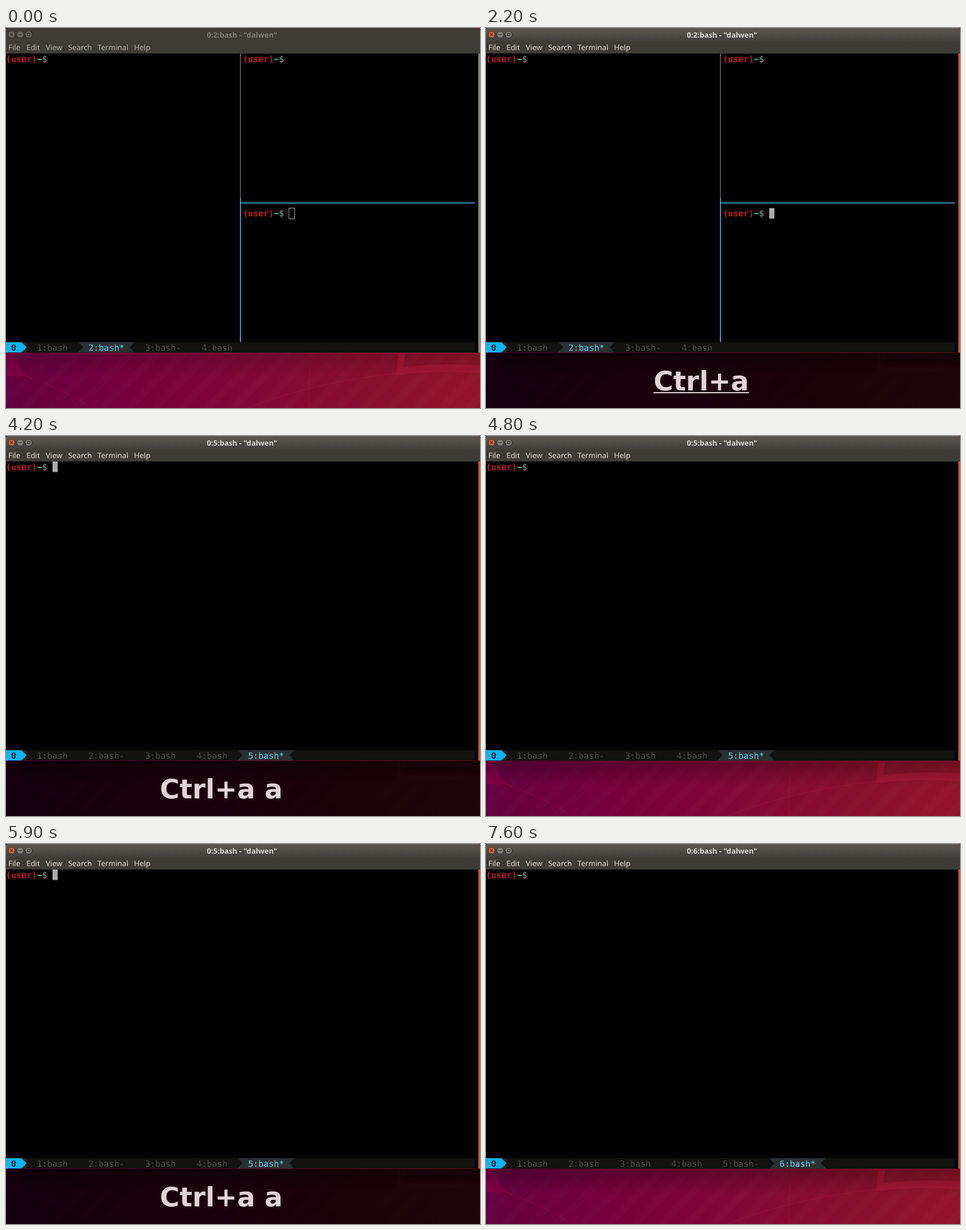
Write an HTML page that moves like this. It is 835 px wide and 670 px high and loops after 8 s.

```html
<!DOCTYPE html>
<html lang="en">
<head>
<meta charset="utf-8">
<title>Terminal windows</title>
<style>
html, body { margin: 0; width: 100%; height: 100%; overflow: hidden; background: #000; }
svg { display: block; width: 835px; height: 670px; }
text { text-rendering: geometricPrecision; }
.ui { font: 13.3px "Noto Sans", "Open Sans", sans-serif; fill: #dfdbd2; }
.title { font-size: 13.1px; font-weight: 700; text-anchor: middle; }
.mono { font: 15.07px "DejaVu Sans Mono", monospace; fill: #aaa; }
.bold { font-weight: 700; }
.keys { font: 700 47.2px "DejaVu Sans", sans-serif; fill: #e4d3d9; text-anchor: middle; }
.btn { stroke: #2f2e2a; stroke-width: 1; }
.mark { fill: none; stroke: #35342f; stroke-width: 1.1; }
.blur .ui { fill: #b3b0a8; }
.blur .title { fill: #7f7d76; }
.blur .btn { fill: #66655f; }
</style>
</head>
<body>
<svg id="stage" viewBox="0 0 835 670">
  <defs>
    <linearGradient id="wall" gradientUnits="userSpaceOnUse" x1="0" y1="670" x2="835" y2="590">
      <stop offset="0" stop-color="#640042"/>
      <stop offset=".25" stop-color="#76003c"/>
      <stop offset=".6" stop-color="#840a34"/>
      <stop offset="1" stop-color="#931428"/>
    </linearGradient>
    <linearGradient id="bar" x2="0" y2="1">
      <stop offset="0" stop-color="#5b5a52"/>
      <stop offset="1" stop-color="#3f3e39"/>
    </linearGradient>
    <linearGradient id="shade" x2="0" y2="1">
      <stop offset="0" stop-opacity=".28"/>
      <stop offset="1" stop-opacity="0"/>
    </linearGradient>
  </defs>

  <rect width="835" height="670" fill="url(#wall)"/>
  <g id="stripes" stroke="#fff" stroke-opacity=".012" stroke-width="14"></g>
  <path d="M0 573H17Q22 595 34 613Q16 617 0 612Z" fill="#9c0052" opacity=".45"/>
  <g fill="none" stroke="#b02040" stroke-opacity=".22" stroke-width="1.5">
    <path d="M538 573Q533 620 533 670M425 670Q550 622 690 609M30 612Q110 640 150 670"/>
  </g>
  <path d="M691 573H704L700 598Q765 590 835 595V609Q755 603 687 612Z" fill="#a91b38" opacity=".7"/>
  <rect id="shadow" y="572" width="835" height="46" fill="url(#shade)"/>

  <g id="frame">
    <path d="M0 45V4Q0 0 4 0H831Q835 0 835 4V45Z" fill="#3d3c37"/>
    <path id="barTop" d="M0 24V4Q0 0 4 0H831Q835 0 835 4V24Z" fill="url(#bar)"/>
    <circle class="btn" cx="10" cy="11.5" r="6" fill="#e0593a"/>
    <circle class="btn" cx="25" cy="11.5" r="6" fill="#7f7d74"/>
    <circle class="btn" cx="40" cy="11.5" r="6" fill="#7f7d74"/>
    <path class="mark" d="M7.8 9.3l4.4 4.4m0-4.4l-4.4 4.4M22 11.5h6M37.7 9.2h4.6v4.6h-4.6z"/>
    <text id="title" class="ui title" x="415.7" y="16.5"></text>
    <g id="menu"></g>
  </g>

  <rect y="45" width="835" height="527" fill="#000"/>
  <rect id="edge" x="832" y="45" width="3" height="527"/>
  <g id="split">
    <path d="M413 45V299.5" stroke="#4c4c4c" stroke-width="2"/>
    <path d="M413 299.5V554M412 308.5H826" fill="none" stroke="#369bc6" stroke-width="2"/>
  </g>
  <g id="prompts"></g>
  <rect id="cursor"/>
  <g id="status"></g>

  <g id="overlay">
    <rect y="573" width="835" height="97" fill="#000" opacity=".8"/>
    <text id="keys" class="keys" x="379.2" y="639"></text>
    <rect id="line" y="642" height="2" fill="#e4d3d9"/>
  </g>
</svg>
<script>
const CELL = 9.072, ROW = 18.18, TOP = 45, LOOP = 8000;
const HOST = "dalwen";
const $ = id => document.getElementById(id);
const colX = c => c * CELL;
const rowY = r => TOP + r * ROW;

function add(parent, tag, attrs, content = "") {
  const el = document.createElementNS("http://www.w3.org/2000/svg", tag);
  for (const k in attrs) el.setAttribute(k, attrs[k]);
  el.textContent = content;
  parent.append(el);
  return el;
}
function set(el, attrs) {
  for (const k in attrs) el.setAttribute(k, attrs[k]);
}
function show(el, on) {
  el.style.display = on ? "" : "none";
}
function mono(parent, col, row, content, fill, bold) {
  add(parent, "text", {
    x: colX(col), y: rowY(row) + 14.5, fill, class: bold ? "mono bold" : "mono", style: `fill:${fill}`
  }, content);
}

function prompt(col, row) {
  const g = add($("prompts"), "g", {});
  mono(g, col, row, "(user)", "#c5182a", true);
  mono(g, col + 6, row, "~", "#34dcd8", true);
  mono(g, col + 7, row, "$", "#aaa");
  return g;
}

// Tabs follow each other with four blank cells between their labels.
function drawStatus(active, last, count) {
  const g = $("status"), y = 554, h = 18, mid = y + h / 2;
  g.replaceChildren();
  add(g, "rect", { y, width: 826, height: h, fill: "#12120f" });
  add(g, "rect", { x: colX(3), y, width: CELL, height: h, fill: "#232323" });
  add(g, "path", { d: `M0 ${y}H${colX(3)}L${colX(4)} ${mid}L${colX(3)} ${y + h}H0Z`, fill: "#10b4f4" });
  mono(g, 1, 28, "0", "#10202a", true);
  let col = 6;
  for (let i = 1; i <= count; i++) {
    const label = `${i}:bash` + (i === active ? "*" : i === last ? "-" : "");
    if (i === active) {
      const a = colX(col - 2), b = colX(col + 9);
      add(g, "path", {
        d: `M${a} ${y}H${b}L${b - CELL} ${mid}L${b} ${y + h}H${a}L${a + CELL} ${mid}Z`, fill: "#2c3033"
      });
    }
    mono(g, col, 28, label, i === active ? "#60d2ee" : "#4c4c4a");
    col += label.length + 4;
  }
}

// Each step changes only the named parts of the state.
const steps = [
  [0, { focus: 0, win: 2, last: 3, count: 4, ready: 1, cursor: 1, keys: "", line: 0 }],
  [800, { focus: 1 }],
  [1500, { cursor: 0 }],
  [1900, { cursor: 1 }],
  [2200, { keys: "Ctrl+a", line: 1 }],
  [2300, { line: 0 }],
  [2700, { cursor: 0 }],
  [3000, { cursor: 1, keys: "Ctrl+a a", line: 1 }],
  [3200, { win: 5, last: 2, count: 5, ready: 0, line: 0 }],
  [3500, { ready: 1 }],
  [3600, { cursor: 0 }],
  [4200, { cursor: 1 }],
  [4800, { cursor: 0, keys: "" }],
  [5100, { cursor: 1, keys: "Ctrl+a", line: 1 }],
  [5200, { line: 0 }],
  [5600, { cursor: 0 }],
  [5800, { cursor: 1, keys: "Ctrl+a a", line: 1 }],
  [5900, { line: 0 }],
  [6000, { win: 6, last: 5, count: 6, ready: 0 }],
  [6400, { ready: 1, cursor: 0 }],
  [7000, { cursor: 1 }],
  [7300, { keys: "" }],
  [7600, { cursor: 0 }]
];

for (let x = -60; x < 900; x += 46) {
  add($("stripes"), "path", { d: `M${x} 670l100 -100` });
}
[["File", 4], ["Edit", 36], ["View", 70], ["Search", 109.5], ["Terminal", 161], ["Help", 225.5]]
  .forEach(([name, x]) => add($("menu"), "text", { class: "ui", x, y: 39 }, name));
const first = prompt(0, 0);
const panes = [prompt(46, 0), prompt(46, 15)];

function render(s) {
  const split = s.win === 2;
  $("frame").setAttribute("class", s.focus ? "" : "blur");
  show($("barTop"), s.focus);
  set($("shadow"), { opacity: s.focus ? 1 : 0.6 });
  set($("edge"), { fill: s.focus ? "#c4552f" : "#84827c" });
  $("title").textContent = `0:${s.win}:bash - "${HOST}"`;
  show($("split"), split);
  panes.forEach(p => show(p, split));
  show(first, s.ready);

  const x = split ? 499 : s.ready ? 82 : 0, y = split ? 317 : 45;
  show($("cursor"), s.cursor);
  set($("cursor"), s.focus
    ? { x, y: y + (split ? 0.5 : 0), width: 9, height: 18.5, fill: "#aaa", stroke: "none" }
    : { x: x - 0.5, y: y + 0.5, width: 10, height: 19, fill: "none", stroke: "#aaa" });

  drawStatus(s.win, s.last, s.count);
  show($("overlay"), s.keys);
  $("keys").textContent = s.keys;
  show($("line"), s.line);
  set($("line"), s.keys === "Ctrl+a" ? { x: 295, width: 168 } : { x: 455.5, width: 31.5 });
}

let current = -1;
function tick() {
  const t = performance.now() % LOOP;
  const index = steps.filter(([at]) => at <= t).length - 1;
  if (index !== current) {
    current = index;
    render(Object.assign({}, ...steps.slice(0, index + 1).map(step => step[1])));
  }
  requestAnimationFrame(tick);
}
tick();
</script>
</body>
</html>
```
